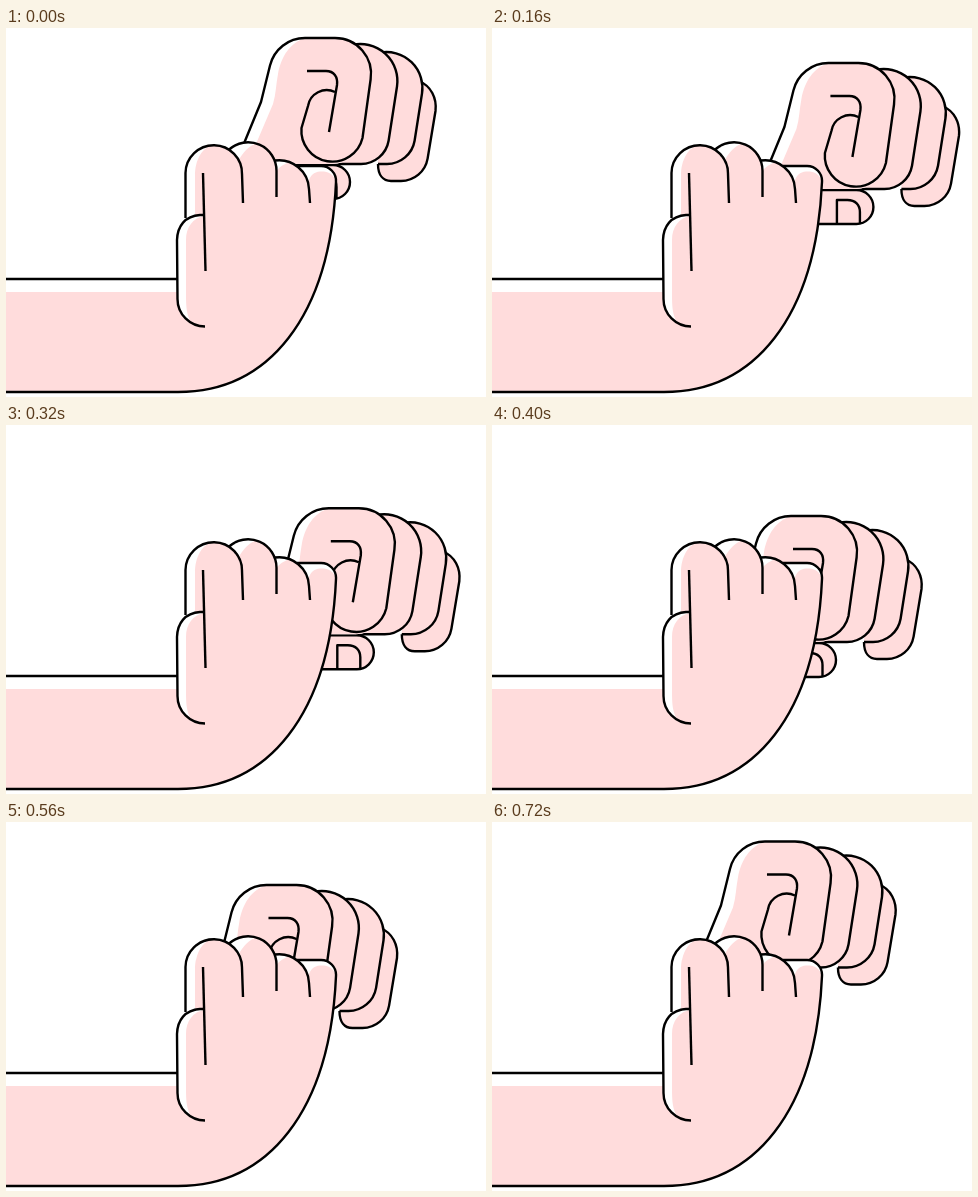
Write an HTML page that moves like this. It is 480 px wide and 369 px high and loops after 0.8 s.

```html
<!DOCTYPE html>
<html lang="en">
<head>
<meta charset="utf-8">
<title>Circling fist</title>
<style>
  html, body { margin: 0; width: 100%; height: 100%; overflow: hidden; background: #fff; }
  svg { display: block; width: 100vw; height: 100vh; }
  path { fill: none; stroke: #000; stroke-width: 2.4; stroke-linecap: butt; stroke-linejoin: round; }
  .skin { fill: #ffdcdc; }
  .light { fill: #fff; }
  .flat { stroke: none; }

  /* The fist rides a circle in ten held poses. */
  .fist {
    --a: 0deg;
    transform: rotate(var(--a)) translateY(-40.5px) rotate(calc(-1 * var(--a)));
    animation: circle 800ms step-end infinite;
  }
  @keyframes circle {
    0%   { --a: 0deg; }
    10%  { --a: 22.5deg; }
    20%  { --a: 67.5deg; }
    30%  { --a: 108deg; }
    40%  { --a: 144deg; }
    50%  { --a: 180deg; }
    60%  { --a: 216deg; }
    70%  { --a: 252deg; }
    80%  { --a: 288deg; }
    90%  { --a: 320deg; }
    100% { --a: 360deg; }
  }
</style>
</head>
<body>
<svg viewBox="0 0 480 369" preserveAspectRatio="none">
  <g transform="translate(0 40.5)">
    <g class="fist">
      <!-- thumb and nail -->
      <path class="skin" d="M270 137H327A17 17 0 0 1 327 171H270"/>
      <path d="M307.500 171V147H318C326 147 330.500 152 330.500 159V171"/>
      <!-- outer fingers, back to front -->
      <path class="skin" d="M413 53C425 58 431 70 429.500 83L421.600 130.600A27 27 0 0 1 395 153H385C377 153 372 147 372 136"/>
      <path class="skin" d="M374 24.600A36 36 0 0 1 416 65.500L408.600 112.800A28 28 0 0 1 381 136H372"/>
      <path class="skin" d="M346 17A37 37 0 0 1 391 58.500L382.600 112.800A28 28 0 0 1 355 136H326"/>
      <!-- palm and front finger -->
      <path class="light flat" d="M232 130L255 74L264 37.500A36 36 0 0 1 299 10H329A36 36 0 0 1 364.600 51.500L356.500 110A31 31 0 0 1 326 136H232Z"/>
      <path class="skin flat" d="M244 130L267 76C270 66 270 56 272 46C275 29 284 14 300 10H329A36 36 0 0 1 364.600 51.500L356.500 110A31 31 0 0 1 326 136H244Z"/>
      <path d="M232 130L255 74L264 37.500A36 36 0 0 1 299 10H329A36 36 0 0 1 364.600 51.500L356.500 110A31 31 0 0 1 295.500 100L302 78A19 19 0 0 1 329 64"/>
      <path d="M301 43H320C328 43 332 49 331 57L323 104"/>
    </g>
  </g>

  <!-- resting arm and hand -->
  <path class="light flat" d="M0 251H171V212C171 200 174 193 179.500 190V145A28.200 28.200 0 0 1 223 121.500A28.500 28.500 0 0 1 268 132.500C278 132 285 134 291 138H315A15 15 0 0 1 330 153C326 290 262 364 172 364H0Z"/>
  <path class="skin flat" d="M0 264H171.500V271A27.500 27.500 0 0 0 185 294C181 288 180 280 180 268V212C180 199 187 190 198 188H189V148C189 132 196 119 207.500 117A28.200 28.200 0 0 1 233 132C237 124 243 118 250 115.500A28.500 28.500 0 0 1 270.500 143C273 139 278 136 284 134A30 30 0 0 1 302 155C304 147 308 144 314 143.500H318C325 144 329 149 330 155C324 290 262 364 172 364H0Z"/>
  <path d="M0 251H171"/>
  <path d="M0 364H172C262 364 324 290 330 154A15 15 0 0 0 315 138H291"/>
  <path d="M179.500 190V145A28.200 28.200 0 0 1 236 146L237 175"/>
  <path d="M222.500 122A28.500 28.500 0 0 1 270.500 143V169"/>
  <path d="M269 132.500A30 30 0 0 1 303 161L304 175"/>
  <path d="M198 187H194C179 188 171.500 198 171 212L171.500 271A27.500 27.500 0 0 0 199 298.500"/>
  <path d="M197 145L199.500 243"/>
</svg>
</body>
</html>
```
